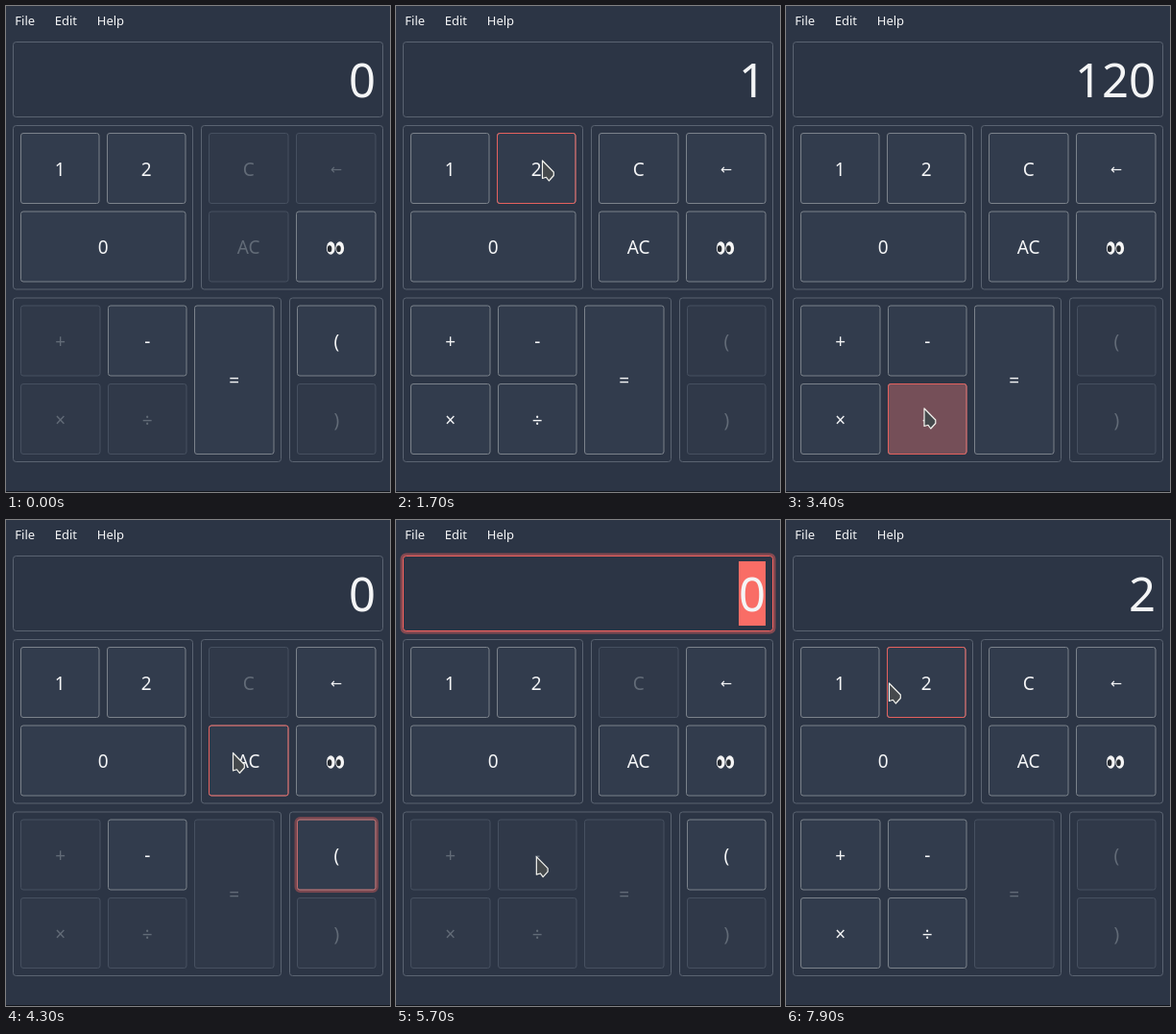
Recreate the animation shown at these times as an HTML page. Size 400 px wide and 506 px high, loop 8000 ms.

```html
<!DOCTYPE html>
<html lang="en">
<head>
<meta charset="utf-8">
<title>Calculator</title>
<style>
html, body { margin: 0; width: 100%; height: 100%; overflow: hidden; background: #2c3545; }
svg { display: block; width: 400px; height: 506px; }
text { font-family: "Noto Sans", "Open Sans", sans-serif; fill: #f4f5f6; }
.menu text { font-size: 13px; }
.frame { fill: none; stroke: #5a6371; }
.glow { fill: none; stroke: #f2635f; stroke-width: 4; opacity: 0; }
.key .face { fill: #323c4d; stroke: #7b828b; }
.key .label { font-size: 19px; text-anchor: middle; }
.key .arrow { font-family: "DejaVu Sans", sans-serif; font-size: 14.5px; }
.key .hot { fill: none; stroke: #e5615e; opacity: 0; }
.key.off .face { fill: #303949; stroke: #465060; }
.key.off .label { fill: #626b77; }
.key.down .face { fill: #754f58; }
.key.focus .glow { opacity: .38; }
.key.focus .hot { opacity: .65; }
#out { font-size: 49px; text-anchor: end; }
#pick { fill: #f96d66; }
.screen.focus .frame { stroke: #f2635f; }
.screen.focus .glow { opacity: .45; }
.screen:not(.focus) #pick { display: none; }
#cursor path { fill: #45494c; stroke: #f3f3ee; stroke-width: 1.2; stroke-linejoin: round; }
</style>
</head>
<body>
<svg viewBox="0 0 400 506" xmlns="http://www.w3.org/2000/svg">
  <rect width="400" height="506" fill="#2c3545"/>
  <rect y="505" width="400" height="1" fill="#12161d"/>
  <g class="menu">
    <text x="9.3" y="20">File</text>
    <text x="50.8" y="20">Edit</text>
    <text x="94.8" y="20">Help</text>
  </g>
  <g class="screen" id="screen">
    <rect class="glow" x="6.5" y="36.5" width="387" height="80" rx="4"/>
    <rect class="frame" x="7.5" y="37.5" width="385" height="78" rx="3" style="fill:#2c3545"/>
    <rect id="pick" x="357" y="43" width="28" height="67"/>
    <text id="out" x="385" y="95.4">0</text>
  </g>
  <rect class="frame" x="7.5" y="124.5" width="187" height="170.5" rx="3"/>
  <rect class="frame" x="203.5" y="124.5" width="189" height="170.5" rx="3"/>
  <rect class="frame" x="7.5" y="304" width="279" height="170.5" rx="3"/>
  <rect class="frame" x="295.5" y="304" width="97" height="170.5" rx="3"/>
  <g id="keys"></g>
  <g id="cursor"><path d="M0 0V18.5L4 17.3L6.8 21L11.8 15.5V12Z"/></g>
</svg>
<script>
const LOOP = 8000, STEP = 100;
const $ = id => document.getElementById(id);

// id, label, x, y, width, height
const layout = [
  ['1', '1', 15.5, 132.5, 81.5, 73],
  ['2', '2', 105.5, 132.5, 81.5, 73],
  ['0', '0', 15.5, 214, 171.5, 73],
  ['C', 'C', 211.5, 132.5, 82.5, 73],
  ['B', '←', 302.5, 132.5, 82.5, 73],
  ['A', 'AC', 211.5, 214, 82.5, 73],
  ['E', '', 302.5, 214, 82.5, 73],
  ['+', '+', 15.5, 312, 82.5, 73],
  ['-', '-', 106.5, 312, 81.5, 73],
  ['*', '×', 15.5, 393.5, 82.5, 73],
  ['/', '÷', 106.5, 393.5, 81.5, 73],
  ['=', '=', 196.5, 312, 82.5, 154.5],
  ['(', '(', 303.5, 312, 81.5, 73],
  [')', ')', 303.5, 393.5, 81.5, 73]
];

// time, display, enabled keys, focused item
const always = '120E';
const states = [
  [0, '0', '-=(', ''],
  [1300, '1', 'CBA+-*/=', ''],
  [2000, '12', 'CBA+-*/=', ''],
  [2700, '120', 'CBA+-*/=', ''],
  [3500, '0', 'BA-(', '('],
  [4600, '0', 'BA-(', ''],
  [4800, '2', 'CBA+-*/)', ''],
  [5600, '0', 'BA(', 'screen'],
  [6800, '0', 'BA(', ''],
  [6900, '2', 'CBA+-*/', '']
];

// press start, release, key
const presses = [
  [1100, 1300, '1'], [1800, 2000, '2'], [2500, 2700, '0'],
  [3300, 3500, '/'], [4000, 4100, '('], [4600, 4800, '2'],
  [5400, 5600, '-'], [6800, 6900, '2']
];

// time, x, y
const path = [
  [700, 140, 16], [900, 92, 118], [1100, 60, 168], [1300, 60, 168],
  [1500, 88, 166], [1600, 132, 163], [1700, 152.5, 161], [2000, 151, 163],
  [2200, 138, 200], [2500, 114, 246], [2700, 114, 247], [3000, 130, 335],
  [3300, 144, 419], [3500, 144, 419], [3700, 232, 398], [3900, 336, 352],
  [4100, 338, 350], [4200, 288, 299], [4300, 236.5, 242.5], [4500, 157, 171],
  [4800, 154, 173], [5000, 163, 240], [5100, 165.5, 304], [5300, 149, 345],
  [5500, 147, 348], [5800, 146, 352], [6000, 147, 346], [6300, 152, 240],
  [6500, 157, 172], [6900, 157, 171], [7100, 148, 174], [7400, 112, 173],
  [7600, 101, 171], [7700, 101, 170], [7800, 106, 170], [7900, 107.5, 170]
];

function el(parent, name, attrs, text) {
  const node = document.createElementNS('http://www.w3.org/2000/svg', name);
  for (const k in attrs) node.setAttribute(k, attrs[k]);
  if (text) node.textContent = text;
  return parent.appendChild(node);
}

function drawEyes(g, cx, cy) {
  for (const dx of [-4.7, 4.7]) {
    el(g, 'ellipse', { cx: cx + dx, cy, rx: 4.4, ry: 6.8, fill: '#f5f5f5' });
    el(g, 'ellipse', { cx: cx + dx - 1.2, cy: cy + .8, rx: 2.3, ry: 3.5, fill: '#262a30' });
  }
}

const keys = layout.map(([id, label, x, y, width, height]) => {
  const g = el($('keys'), 'g', { class: 'key' });
  const cx = x + width / 2, cy = y + height / 2;
  const box = { x, y, width, height, rx: 2.5 };
  el(g, 'rect', { class: 'glow', x: x - 1, y: y - 1, width: width + 2, height: height + 2, rx: 4 });
  el(g, 'rect', { class: 'face', ...box });
  const hot = el(g, 'rect', { class: 'hot', ...box });
  if (label) el(g, 'text', { class: id === 'B' ? 'label arrow' : 'label', x: cx, y: cy + (id === 'B' ? 6 : 7.5) }, label);
  else drawEyes(g, 343, 252);
  return { id, x, y, width, height, g, hot };
});

const stateAt = t => states.filter(s => s[0] <= t).pop();

function cursorAt(t) {
  if (t < path[0][0]) return null;
  const i = path.findIndex(p => p[0] > t);
  if (i < 0) return path[path.length - 1].slice(1);
  const [t0, x0, y0] = path[i - 1], [t1, x1, y1] = path[i];
  const k = (t - t0) / (t1 - t0);
  return [x0 + (x1 - x0) * k, y0 + (y1 - y0) * k];
}

const isOn = (key, t) => (always + stateAt(t)[2]).includes(key.id);

function hovered(key, t) {
  const p = cursorAt(t);
  return p && isOn(key, t) &&
    p[0] >= key.x && p[0] <= key.x + key.width &&
    p[1] >= key.y && p[1] <= key.y + key.height;
}

function render(t) {
  const [, value, , focus] = stateAt(t);
  const press = presses.find(p => t >= p[0] && t < p[1]);
  $('out').textContent = value;
  $('screen').classList.toggle('focus', focus === 'screen');
  for (const key of keys) {
    const on = isOn(key, t);
    key.g.classList.toggle('off', !on);
    key.g.classList.toggle('down', !!press && press[2] === key.id);
    key.g.classList.toggle('focus', focus === key.id);
    const level = hovered(key, t) ? 1 : on && hovered(key, t - STEP) ? .65 : 0;
    key.hot.style.opacity = level || '';
  }
  const p = cursorAt(t);
  $('cursor').style.display = p ? '' : 'none';
  if (p) $('cursor').setAttribute('transform', `translate(${p[0]} ${p[1]})`);
}

const start = performance.now();
function tick() {
  const t = (performance.now() - start) % LOOP;
  render(Math.floor(t / STEP) * STEP);
  requestAnimationFrame(tick);
}
tick();
</script>
</body>
</html>
```
